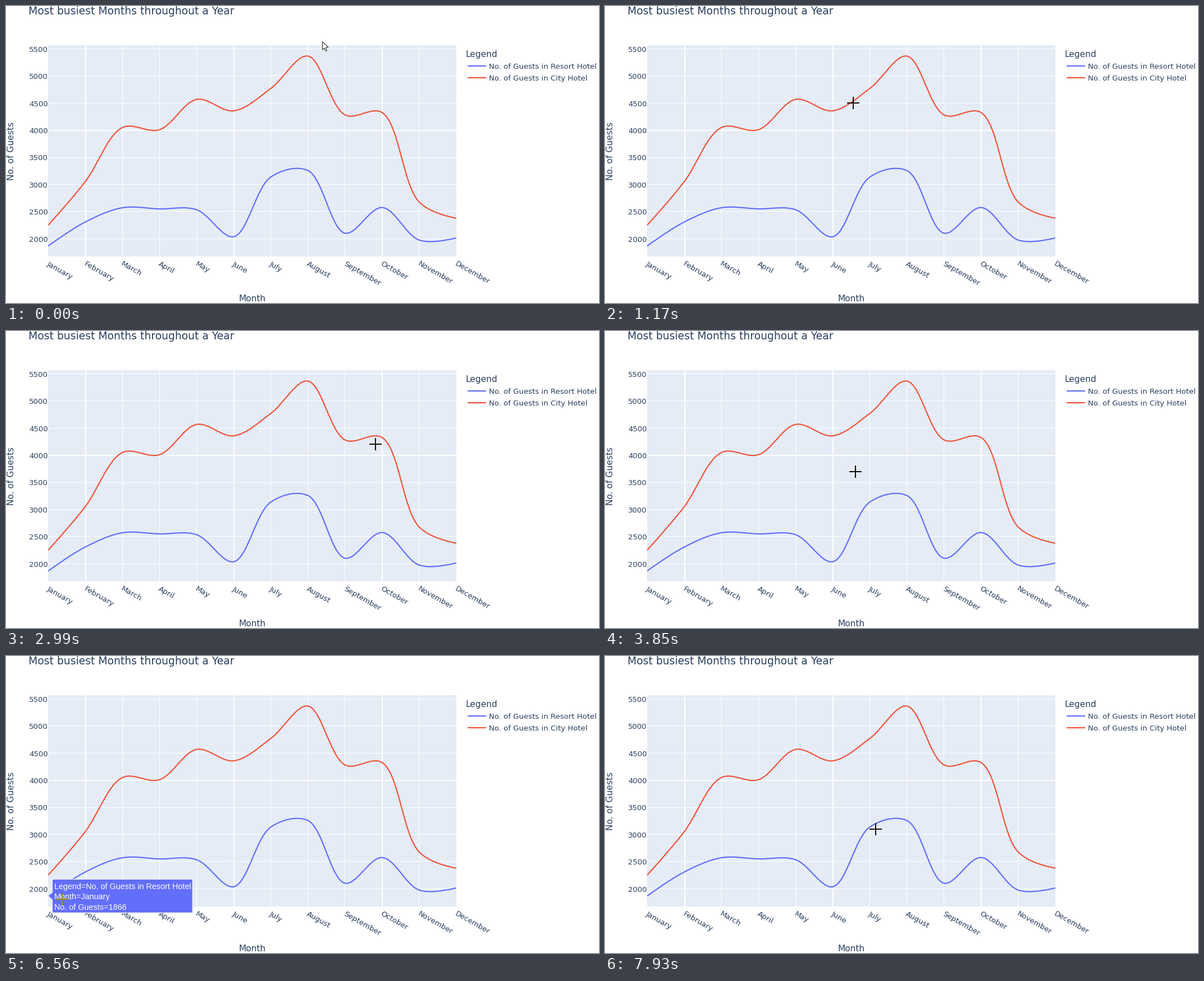
These frames come from a looping animation (1056 px wide and 530 px high, 8 s). A matplotlib script:

```python
import numpy as np
import matplotlib.pyplot as plt
from matplotlib.animation import FuncAnimation
from matplotlib.patches import PathPatch, Polygon, Rectangle
from matplotlib.path import Path

W, H, DPI = 1056, 530, 100
STEP, LOOP = 50, 8000
PX = 72 / DPI  # points per pixel
INK, RED, BLUE = "#2a3f5f", "#EF553B", "#636EFA"
LEFT, RIGHT, TOP, BOTTOM = 75, 802, 70, 447

MONTHS = ["January", "February", "March", "April", "May", "June", "July",
          "August", "September", "October", "November", "December"]
CITY = [2249, 3051, 4049, 4010, 4568, 4358, 4770, 5367, 4283, 4326, 2676, 2377]
RESORT = [1866, 2308, 2571, 2550, 2535, 2037, 3137, 3257, 2102, 2575, 1975, 2014]
# name, values, line colour, label text and edge colour, inverted colour, label width
HOTELS = {
    "city": ("City", CITY, RED, "#444444", "#10AAC4", 232.5),
    "resort": ("Resort", RESORT, BLUE, "white", "#9C9105", 250),
}

# Cursor path: time, x, y
TRACK = np.array([
    (50, 567, 72), (200, 548, 84), (350, 537, 89), (670, 537, 89),
    (900, 474, 146), (1000, 463, 156), (1150, 442, 173), (1200, 438, 176),
    (1400, 410, 190), (1450, 409, 190), (1580, 405, 189), (1700, 404, 189),
    (1900, 440, 193), (1950, 447, 190), (2200, 515, 153), (2500, 599, 185),
    (2700, 607, 195), (2950, 658, 202), (3000, 659, 202), (3250, 669, 190),
    (3580, 669, 190), (3920, 388, 267), (4140, 388, 267), (4650, 92, 382),
    (4850, 80, 390), (4900, 80, 390), (5020, 78, 391), (5280, 78, 391),
    (5680, 78, 427), (6140, 78, 428), (6450, 79, 428), (6550, 100, 434),
    (6750, 190, 456), (7000, 390, 420), (7240, 408, 412), (7300, 408, 412),
    (7900, 482, 309),
])
# Hover labels: start, end, hotel, month index
HOVERS = [
    (150, 700, "city", 7), (850, 1050, "city", 6), (1300, 1980, "city", 5),
    (2550, 2800, "city", 8), (3080, 3640, "city", 9), (4650, 5340, "city", 0),
    (5930, 6620, "resort", 0), (6980, 7440, "resort", 5),
]


def month_x(i):
    return LEFT + i * (RIGHT - LEFT) / 11


def guests_y(v):
    return 415.3 - (v - 2000) * 0.0968


def spline(values):
    """Centripetal Catmull-Rom curve with quadratic ends."""
    pts = np.array([(month_x(i), guests_y(v)) for i, v in enumerate(values)])
    handles = []
    for prev, here, nxt in zip(pts, pts[1:], pts[2:]):
        d1, d2 = prev - here, nxt - here
        a1, a2 = np.hypot(*d1) ** 0.5, np.hypot(*d2) ** 0.5
        num = a2 * a2 * d1 - a1 * a1 * d2
        handles.append((here + num / (3 * a2 * (a1 + a2)),
                        here - num / (3 * a1 * (a1 + a2))))
    verts = [pts[0], handles[0][0], pts[1]]
    codes = [Path.MOVETO, Path.CURVE3, Path.CURVE3]
    for i in range(2, len(pts) - 1):
        verts += [handles[i - 2][1], handles[i - 1][0], pts[i]]
        codes += [Path.CURVE4] * 3
    verts += [handles[-1][1], pts[-1]]
    codes += [Path.CURVE3] * 2
    return Path(verts, codes)


fig = plt.figure(figsize=(W / DPI, H / DPI), dpi=DPI, facecolor="white")
ax = fig.add_axes([0, 0, 1, 1])
ax.set_xlim(0, W)
ax.set_ylim(H, 0)
ax.axis("off")


def write(x, y, text, size, color=INK, font="DejaVu Sans", **kw):
    return ax.text(x, y, text, fontsize=size * PX, color=color, family=font,
                   va=kw.pop("va", "baseline"), **kw)


def block(x, y, w, h, color):
    rect = Rectangle((x, y), w, h, facecolor=color, lw=0)
    return ax.add_patch(rect)


def draw_chart():
    plot = block(LEFT, TOP, RIGHT - LEFT, BOTTOM - TOP, "#E5ECF6")
    for i, name in enumerate(MONTHS):
        x = month_x(i)
        if 0 < i < 11:
            wide = 2 if i in (1, 5, 9) else 1
            block(int(x), TOP, wide, BOTTOM - TOP, "white")
        write(x - 3.3, 462.4, name, 13.25, rotation=-30,
              rotation_mode="anchor", ha="left")
    for v in range(2000, 5501, 500):
        y = guests_y(v)
        block(LEFT, int(y), RIGHT - LEFT, 2 if v == 4000 else 1, "white")
        write(74.5, y + 5.3, str(v), 13.25, ha="right")

    for key, y in (("resort", 107), ("city", 127.5)):
        name, values, color = HOTELS[key][:3]
        curve = ax.add_patch(PathPatch(spline(values), fill=False,
                                       edgecolor=color, lw=2.2 * PX, zorder=2))
        curve.set_clip_path(plot)
        ax.plot([822, 855], [y, y], color=color, lw=2.2 * PX,
                solid_capstyle="butt")
        write(860.3, y + 5, f"No. of Guests in {name} Hotel", 13.3)

    write(39.8, 15, "Most busiest Months throughout a Year", 18.75)
    write(818, 91, "Legend", 15.4)
    write(438.7, 527, "Month", 15.4, ha="center")
    write(14, 258.5, "No. of Guests", 15.5, rotation=90,
          rotation_mode="anchor", ha="center")


draw_chart()

bubble = ax.add_patch(Polygon([(0, 0), (1, 0), (1, 1)], closed=True,
                              lw=1.1 * PX, zorder=6, joinstyle="miter"))
lines = [write(0, 0, "", 14.35, font="Liberation Sans", zorder=7)
         for _ in range(3)]
cross, cross_inv = (ax.plot([], [], lw=2 * PX, color="#110D08", zorder=z,
                            solid_capstyle="butt")[0] for z in (8, 9))
arrow = ax.add_patch(Polygon(
    np.array([(0, 0), (0, 14.5), (3.3, 11.5), (5.8, 17), (8, 16),
              (5.6, 10.8), (10.3, 10.3)]) + (563.5, 63.5),
    closed=True, facecolor="white", edgecolor="#222222", lw=PX, zorder=8))


def show_label(hotel, month):
    name, values, color, ink, inverse, width = HOTELS[hotel]
    px, py = month_x(month), guests_y(values[month])
    x0, x1 = px + 7.3, px + 7.3 + width
    bubble.set_xy([(px, py), (x0, py - 6.6), (x0, py - 30), (x1, py - 30),
                   (x1, py + 30), (x0, py + 30), (x0, py + 6.6)])
    bubble.set_facecolor(color)
    bubble.set_edgecolor(ink)
    texts = (f"Legend=No. of Guests in {name} Hotel",
             f"Month={MONTHS[month]}", f"No. of Guests={values[month]}")
    for i, (line, text) in enumerate(zip(lines, texts)):
        line.set_text(text)
        line.set_position((px + 10.9, py - 12.6 + 18.6 * i))
        line.set_color(ink)
    cross_inv.set_color(inverse)
    cross_inv.set_clip_path(Rectangle((x0, py - 30), width, 60,
                                      transform=ax.transData))


def update(n):
    t = n * STEP
    hover = next((h for h in HOVERS if h[0] <= t < h[1]), None)
    for part in (bubble, cross_inv, *lines):
        part.set_visible(hover is not None)
    if hover:
        show_label(*hover[2:])

    x, y = (round(np.interp(t, TRACK[:, 0], TRACK[:, k])) for k in (1, 2))
    for c in (cross, cross_inv):
        c.set_data([x - 11, x + 11, np.nan, x, x],
                   [y, y, np.nan, y - 11, y + 11])
    arrow.set_visible(t < 70)
    cross.set_visible(t >= 70)
    return bubble, cross, cross_inv, arrow, *lines


anim = FuncAnimation(fig, update, frames=LOOP // STEP, interval=STEP,
                     repeat=True, repeat_delay=0, blit=False)
plt.show()
```
